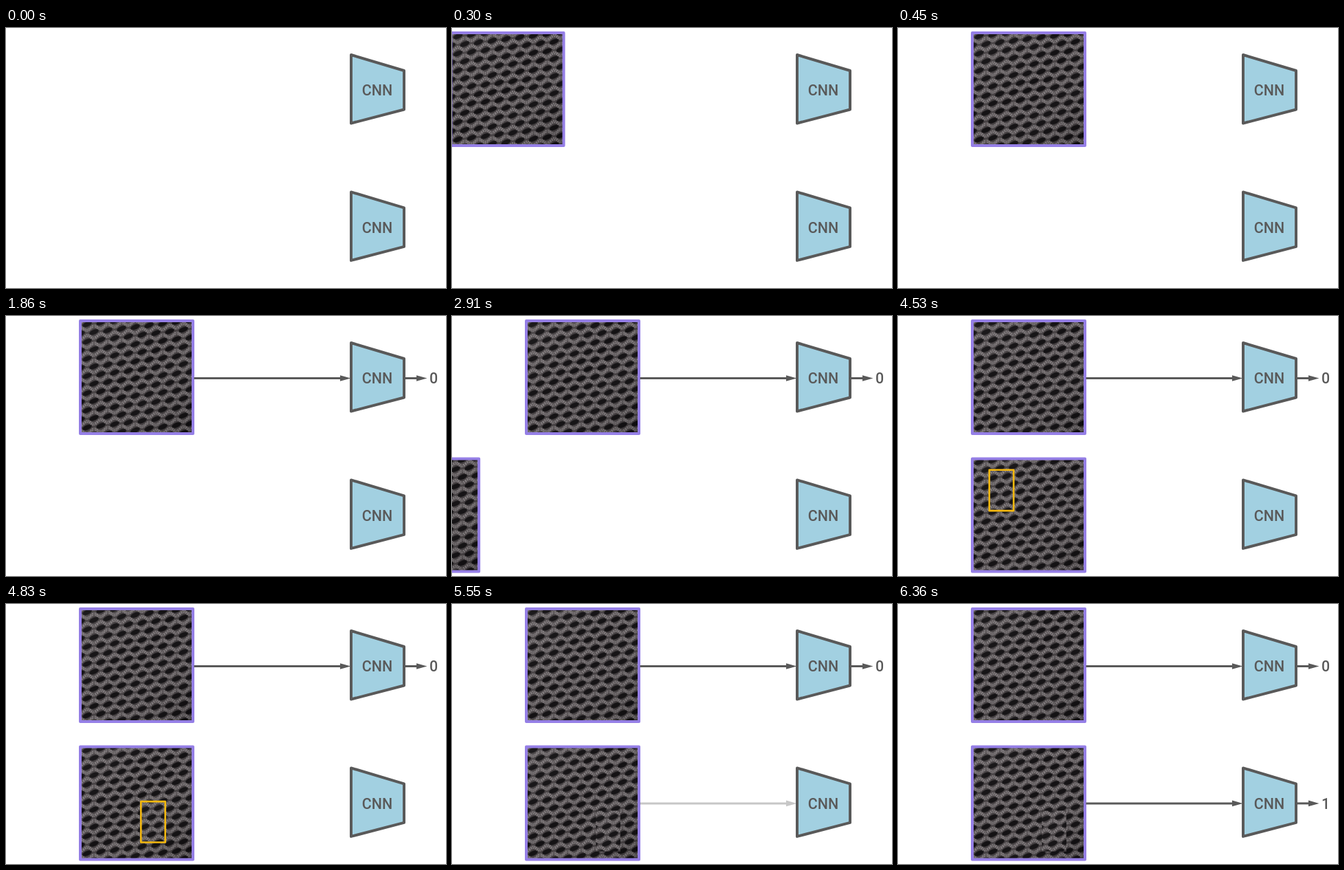
Recreate the animation shown at these times as an HTML page. Size 640 by 378 pixels, loop 7.2 s.

```html
<!DOCTYPE html>
<html lang="en">
<head>
<meta charset="utf-8">
<title>Mesh classifier</title>
<style>
  html, body { margin: 0; width: 100%; height: 100%; overflow: hidden; background: #fff; }
  svg { display: block; width: 640px; height: 378px; }
  text { font: 500 21.4px Roboto, Arial, sans-serif; fill: #595959; text-anchor: middle; }
  .net path { fill: #a2d0e1; stroke: #595959; stroke-width: 4; stroke-linejoin: round; }
  .line { stroke: #595959; stroke-width: 3; }
  .head { fill: #595959; }
  .border { fill: none; stroke: #957fe6; stroke-width: 4; stroke-linejoin: round; }
  .marker { fill: none; stroke: #f5b90f; stroke-width: 2.6; stroke-linejoin: round; }
  .strand { fill: none; stroke: #878183; stroke-width: 2; stroke-dasharray: 2 1; }
</style>
</head>
<body>
<svg viewBox="0 0 640 378">
  <defs>
    <pattern id="mesh" width="20" height="25" patternUnits="userSpaceOnUse" patternTransform="translate(108 7) skewY(-7)">
      <rect width="20" height="25" fill="#403b3d"/>
      <g id="knit"></g>
    </pattern>
    <linearGradient id="shade" x2="1" y2="1">
      <stop offset="0" stop-color="#fff" stop-opacity=".07"/>
      <stop offset=".5" stop-color="#fff" stop-opacity=".03"/>
      <stop offset="1" stop-color="#000" stop-opacity=".14"/>
    </linearGradient>
    <clipPath id="cut"><rect x="24.5" y="16" width="35.4" height="59.4"/></clipPath>
    <g id="cloth">
      <rect x="108" y="7" width="164" height="164" fill="url(#mesh)"/>
      <rect x="108" y="7" width="164" height="164" fill="url(#shade)"/>
    </g>
    <g id="photo">
      <use href="#cloth"/>
      <rect class="border" x="108" y="7" width="164" height="164"/>
    </g>
    <g id="net" class="net">
      <path d="M502 39L579 62V118.5L502 138.5Z"/>
      <text x="540" y="98.3">CNN</text>
    </g>
    <g id="input">
      <path class="line" d="M273.5 90.5H488"/>
      <path class="head" d="M486 86.2L501.5 90.5L486 94.8Z"/>
    </g>
    <g id="output">
      <path class="line" d="M580 90.5H599"/>
      <path class="head" d="M597 86.2L612.5 90.5L597 94.8Z"/>
    </g>
  </defs>

  <use href="#net"/>
  <use href="#net" y="199.4"/>
  <use id="photoA" href="#photo"/>
  <use id="inA" href="#input"/>
  <g id="outA"><use href="#output"/><text x="622" y="98.3">0</text></g>

  <g id="photoB"><use href="#photo" y="200.4"/></g>
  <g id="patch">
    <g transform="translate(108 207.4)">
      <g clip-path="url(#cut)"><use href="#cloth" x="-108" y="-7"/></g>
    </g>
    <rect id="marker" class="marker" x="132.5" y="223.4" width="35.4" height="59.4"/>
  </g>
  <use id="inB" href="#input" y="199.4"/>
  <g id="outB"><use href="#output" y="199.4"/><text x="622" y="297.7">1</text></g>
</svg>
<script>
  const LOOP = 7200, TICK = 30;
  const $ = id => document.getElementById(id);

  // Tilted holes in two staggered rows, with twisted strands waving between them.
  const hole = (x, y) =>
    `<ellipse rx="7" ry="3.7" fill="#0c0a0c" transform="translate(${x} ${y}) rotate(-15)"/>`;
  const strand = (x, y) =>
    `<path class="strand" d="M${x - 20} ${y}q5 -5 10 0t10 0t10 0t10 0t10 0t10 0"/>`;
  const row = (x, y) =>
    hole(x, y) + hole(x + 20, y) + strand(x - 5, y - 5) + strand(x + 5, y + 5);
  $('knit').innerHTML = row(0, -6.25) + row(-10, 6.25) + row(0, 18.75) + row(-10, 31.25);

  const progress = (t, from, to) => Math.min(1, Math.max(0, (t - from) / (to - from)));
  const quad = u => u < .5 ? 2 * u * u : 1 - 2 * (1 - u) ** 2;

  // cubic-bezier(.4, 0, .2, 1), solved by bisection
  function glide(u) {
    let lo = 0, hi = 1;
    for (let i = 0; i < 24; i++) {
      const s = (lo + hi) / 2, r = 1 - s;
      if (1.2 * r * r * s + .6 * r * s * s + s ** 3 < u) lo = s; else hi = s;
    }
    return 3 * (1 - lo) * lo * lo + lo ** 3;
  }

  const slides = [['photoA', 120, 445], ['photoB', 2820, 3145]];
  const fades = [
    ['inA', 900, 1350], ['outA', 1500, 1860], ['patch', 3600, 4050],
    ['inB', 5400, 5850], ['outB', 6000, 6360]
  ];

  function draw(now) {
    const t = Math.floor(now % LOOP / TICK) * TICK;
    for (const [id, from, to] of slides) {
      const x = -275 * (1 - quad(progress(t, from, to)));
      $(id).setAttribute('transform', `translate(${x} 0)`);
    }
    for (const [id, from, to] of fades) $(id).style.opacity = progress(t, from, to);
    const d = 77 * glide(progress(t, 4505, 5100));
    $('patch').setAttribute('transform', `translate(${d} ${d})`);
    $('marker').style.opacity = t < 5100 ? 1 : 0;
  }

  function frame() {
    draw(performance.now());
    requestAnimationFrame(frame);
  }
  frame();
</script>
</body>
</html>
```
